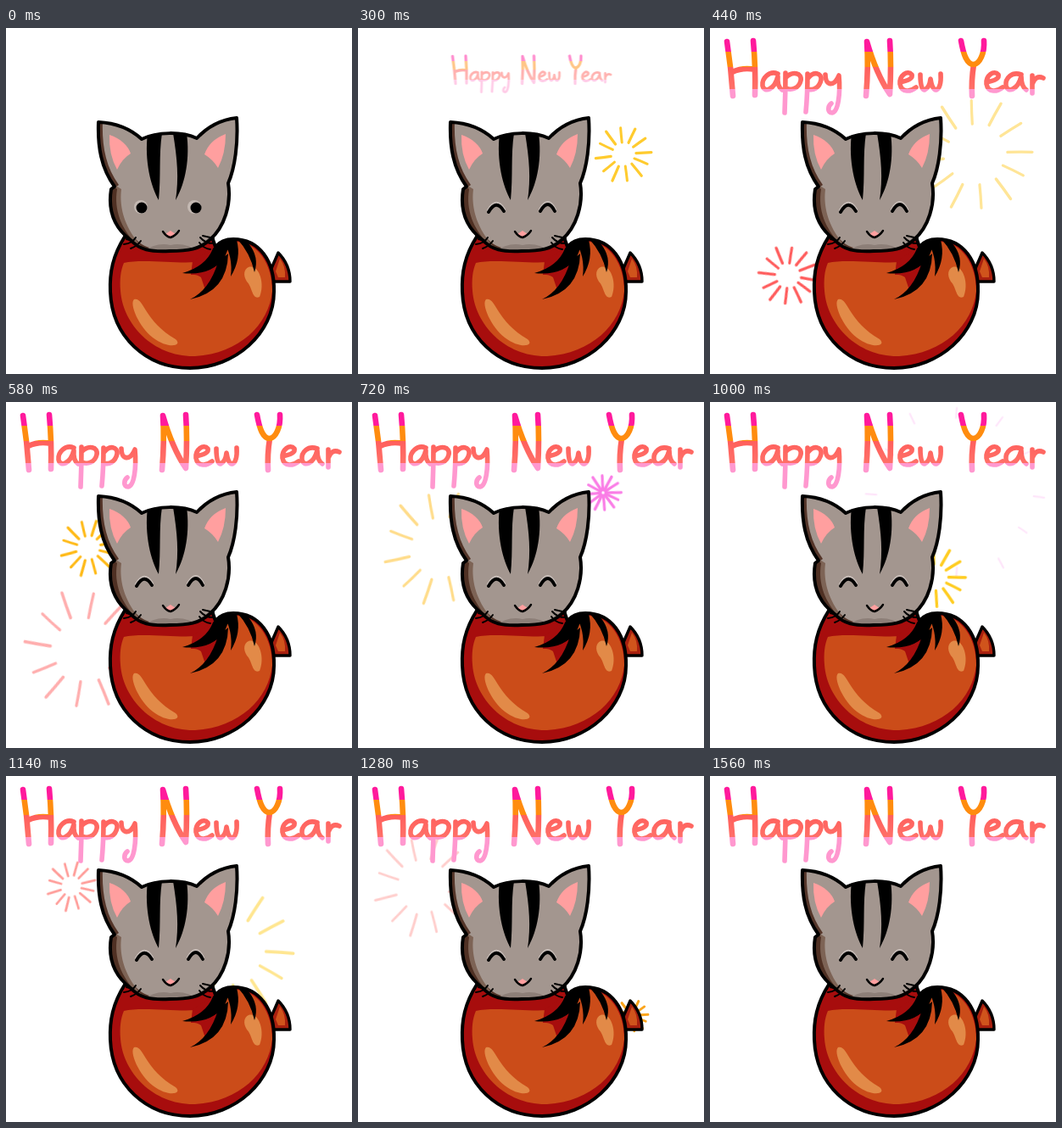
Recreate the animation shown at these times as an HTML page without scripts. Size 408x408 px, loop 2.06 s.

```html
<!DOCTYPE html>
<html lang="en">
<head>
<meta charset="utf-8">
<title>Happy New Year</title>
<style>
  html, body { margin: 0; width: 100%; height: 100%; overflow: hidden; background: #fff; }
  svg { display: block; width: 100vw; height: 100vh; }
  .line { fill: none; stroke: #000; stroke-linecap: round; stroke-linejoin: round; }
  .awake, .happy, .greeting, .sky, .burst { animation: 2060ms step-end infinite; }
  .awake { animation-name: awake; }
  .happy { animation-name: happy; }
  .sky { animation-name: sky; }
  .greeting { animation-name: grow; transform-origin: 208px 61px; }
  .burst { animation-name: burst; animation-delay: calc(var(--start) * 1ms - 2060ms); fill: none; stroke-linecap: round; }
  @keyframes awake { 0% { opacity: 1 } 14.563%, 100% { opacity: 0 } }
  @keyframes happy { 0% { opacity: 0 } 14.563%, 100% { opacity: 1 } }
  @keyframes sky { 0% { opacity: 0 } 14.563% { opacity: 1 } 75.728%, 100% { opacity: 0 } }
  @keyframes grow {
    0% { opacity: 0; transform: scale(.5) }
    14.563% { opacity: .5; transform: translate(-2.5px, -5px) scale(.5) }
    17.961% { opacity: .75; transform: translate(-1px, -2px) scale(.75) }
    21.359%, 100% { opacity: 1; transform: none }
  }
  /* each ray is one dash sliding outwards */
  @keyframes burst {
    0% { opacity: 1; stroke-width: 3px; stroke-dasharray: 16px 999px; stroke-dashoffset: -3px }
    3.398% { opacity: 1; stroke-width: 3.2px; stroke-dasharray: 18px 999px; stroke-dashoffset: -15px }
    6.796% { opacity: .8; stroke-width: 3.4px; stroke-dasharray: 26px 999px; stroke-dashoffset: -25px }
    10.194% { opacity: .5; stroke-width: 3.4px; stroke-dasharray: 29px 999px; stroke-dashoffset: -38px }
    13.592% { opacity: .2; stroke-width: 2px; stroke-dasharray: 11px 999px; stroke-dashoffset: -83px }
    16.99%, 100% { opacity: 0 }
  }
</style>
</head>
<body>
<svg viewBox="0 0 408 408" role="img" aria-label="Happy New Year">
  <defs>
    <linearGradient id="bands" gradientUnits="userSpaceOnUse" x1="0" y1="0" x2="0" y2="100">
      <stop offset=".28" stop-color="#ff1a9c"/><stop offset=".28" stop-color="#ff8c0f"/>
      <stop offset=".46" stop-color="#ff8c0f"/><stop offset=".46" stop-color="#ff5f5c"/>
      <stop offset=".72" stop-color="#ff7068"/><stop offset=".72" stop-color="#ff98cf"/>
    </linearGradient>
    <path id="ray" d="M0 0Q60 0 120 14"/>
    <g id="rays">
      <use href="#ray" transform="rotate(-6)"/>
      <use href="#ray" transform="rotate(20) scale(.92)"/>
      <use href="#ray" transform="rotate(48)"/>
      <use href="#ray" transform="rotate(80) scale(.95)"/>
      <use href="#ray" transform="rotate(111) scale(1.02)"/>
      <use href="#ray" transform="rotate(138) scale(.93)"/>
      <use href="#ray" transform="rotate(170)"/>
      <use href="#ray" transform="rotate(203) scale(.92)"/>
      <use href="#ray" transform="rotate(231) scale(1.02)"/>
      <use href="#ray" transform="rotate(262) scale(.95)"/>
      <use href="#ray" transform="rotate(293)"/>
      <use href="#ray" transform="rotate(322) scale(.97)"/>
    </g>
    <path id="head" d="M109 111C130 112 148 120 160 131C178 122 208 122 225 130C238 116 254 108 272 106C274 135 270 165 262 183C266 207 258 235 240 250C228 261 215 263 193 263C170 264 158 262 147 250C127 235 120 215 124 190L128 187C112 165 108 140 109 111Z"/>
    <clipPath id="inHead"><use href="#head"/></clipPath>
    <path id="body" d="M140 246C126 268 122 288 123 311C125 364 165 401 217 401C270 401 316 360 316 311C317 275 299 249 268 249C258 249 251 253 247 258L242 244Z"/>
    <clipPath id="inBody"><use href="#body"/></clipPath>
    <path id="smile" d="M154 217Q163 201 172 216M215 216Q224 200 232 216"/>
    <path id="knot" d="M311 288L321 265Q335 279 335 299H316Z"/>
  </defs>

  <g class="sky">
    <g transform="translate(313 149)"><use class="burst" href="#rays" stroke="#ffcb2e" style="--start:230"/></g>
    <g transform="translate(92 292) rotate(14) scale(1.05)"><use class="burst" href="#rays" stroke="#ff5c5c" style="--start:370"/></g>
    <g transform="translate(97 172) rotate(-8)"><use class="burst" href="#rays" stroke="#ffb914" style="--start:510"/></g>
    <g transform="translate(289 107) rotate(4) scale(1.12)"><use class="burst" href="#rays" stroke="#fa7de6" style="--start:720"/></g>
    <g transform="translate(265 207) rotate(4) scale(1.1)"><use class="burst" href="#rays" stroke="#ffcc20" style="--start:930"/></g>
    <g transform="translate(77 130) rotate(-10) scale(.88)"><use class="burst" href="#rays" stroke="#ff9c98" style="--start:1070"/></g>
    <g transform="translate(323 283)"><use class="burst" href="#rays" stroke="#fba51c" style="--start:1280"/></g>
  </g>

  <g class="greeting" fill="none" stroke="url(#bands)" stroke-width="5.6" stroke-linecap="round" stroke-linejoin="round">
    <g stroke-width="6.6">
      <path d="M20 16Q25 48 27 80M51 15Q54 48 53 79M26 52Q39 46 53 49"/>
      <path d="M184 80Q187 46 185 16Q196 54 212 78Q214 44 212 15"/>
      <path d="M296 15C299 32 303 43 311 43C318 42 324 30 323 15M311 43Q308 62 309 80"/>
    </g>
    <path d="M80 54C70 50 61 59 62 68C64 77 76 73 80 57Q79 69 85 73"/>
    <path d="M89 53Q89 78 88 100M89 59C97 50 109 53 107 62C105 71 96 74 90 71"/>
    <path d="M115 54Q115 78 113 99M115 60C122 50 132 53 131 61C129 71 121 74 116 72"/>
    <path d="M136 55C136 68 146 70 152 56C154 78 151 99 144 100C138 100 139 92 143 89"/>
    <path d="M224 64Q240 61 238 55C233 49 223 56 224 66C226 77 237 75 243 70"/>
    <path d="M248 55Q248 73 253 73Q259 70 260 60Q262 73 267 73Q273 70 272 54"/>
    <path d="M326 64Q342 61 340 55C335 49 325 56 326 66C328 77 339 75 345 70"/>
    <path d="M367 55C356 51 348 59 349 68C351 77 363 73 367 57Q367 69 373 73"/>
    <path d="M380 56Q380 66 380 77M380 66Q384 55 393 59"/>
  </g>

  <use href="#knot" fill="#a9200f"/>
  <path d="M318 287L323 272Q330 281 329 294L321 294Z" fill="#d0541c"/>
  <use class="line" href="#knot" stroke-width="3.4"/>

  <use href="#body" fill="#a70d0d"/>
  <g clip-path="url(#inBody)">
    <path fill="#cb4c19" d="M139 277C160 272 200 278 224 276L236 312C246 285 250 262 270 252C298 252 314 280 314 310C310 350 275 384 223 387C174 388 138 350 135 310C134 297 135 286 139 277Z"/>
    <path fill="#a70d0d" d="M220 275L246 258L258 270C252 290 247 303 232 313C239 298 230 290 218 291Z"/>
    <path fill="#e28a48" d="M151 320C163 317 162 345 200 367C209 375 191 379 173 365C157 353 145 325 151 320ZM286 282C298 278 306 301 299 317C290 321 291 306 284 299C279 291 281 284 286 282Z"/>
    <path d="M244 260Q254 246 266 250L258 270Q242 293 208 289Q236 281 244 260ZM250 276L262 266Q261 311 217 320Q240 309 250 276ZM256 250H272Q278 272 265 293Q268 270 256 250ZM272 248L286 254Q299 270 293 288Q288 265 272 248Z"/>
  </g>
  <use class="line" href="#body" stroke-width="4"/>

  <g clip-path="url(#inHead)">
    <use href="#head" fill="#543529"/>
    <use href="#head" fill="#a3968f" x="5" y="-2"/>
    <path fill="#7d6355" d="M120 180L136 190C133 215 142 238 160 258L140 262L118 230Z"/>
    <path fill="#4f3023" d="M120 180L131 190C127 215 136 236 154 256L140 262L118 230Z"/>
    <path fill="#8d7f78" d="M158 266Q176 252 194 256Q212 252 232 266Z"/>
    <path d="M167 124C163 157 171 187 180 203C183 174 180 150 184 124ZM197 124C202 155 204 177 200 203C212 182 217 153 213 124Z"/>
  </g>
  <path fill="#ff9f9f" d="M122 126C135 130 145 140 147 148Q137 154 131 167Q121 149 122 126ZM259 125Q259 148 250 165Q244 155 234 149Q240 132 259 125Z"/>
  <use class="line" href="#head" stroke-width="4"/>

  <g class="awake">
    <g fill="#c4b9b3"><circle cx="159" cy="211" r="8"/><circle cx="222" cy="211" r="8"/></g>
    <circle cx="160" cy="212" r="6.5"/><circle cx="224" cy="212" r="6.5"/>
  </g>
  <g class="happy">
    <use class="line" href="#smile" y="-2" style="stroke:#c8beb9" stroke-width="4"/>
    <use class="line" href="#smile" stroke-width="3.8"/>
  </g>
  <path fill="#ff9f9f" d="M188 243L194 239L200 243L194 247Z"/>
  <path class="line" stroke-width="2.4" d="M185 240Q189 246 194 247Q200 245 204 239"/>
  <path class="line" stroke-width="2" d="M139 255Q149 254 153 247M147 260Q155 257 159 251M142 249L150 251M229 247Q235 254 244 254M228 253Q233 260 241 261M232 245L245 248"/>
</svg>
</body>
</html>
```
